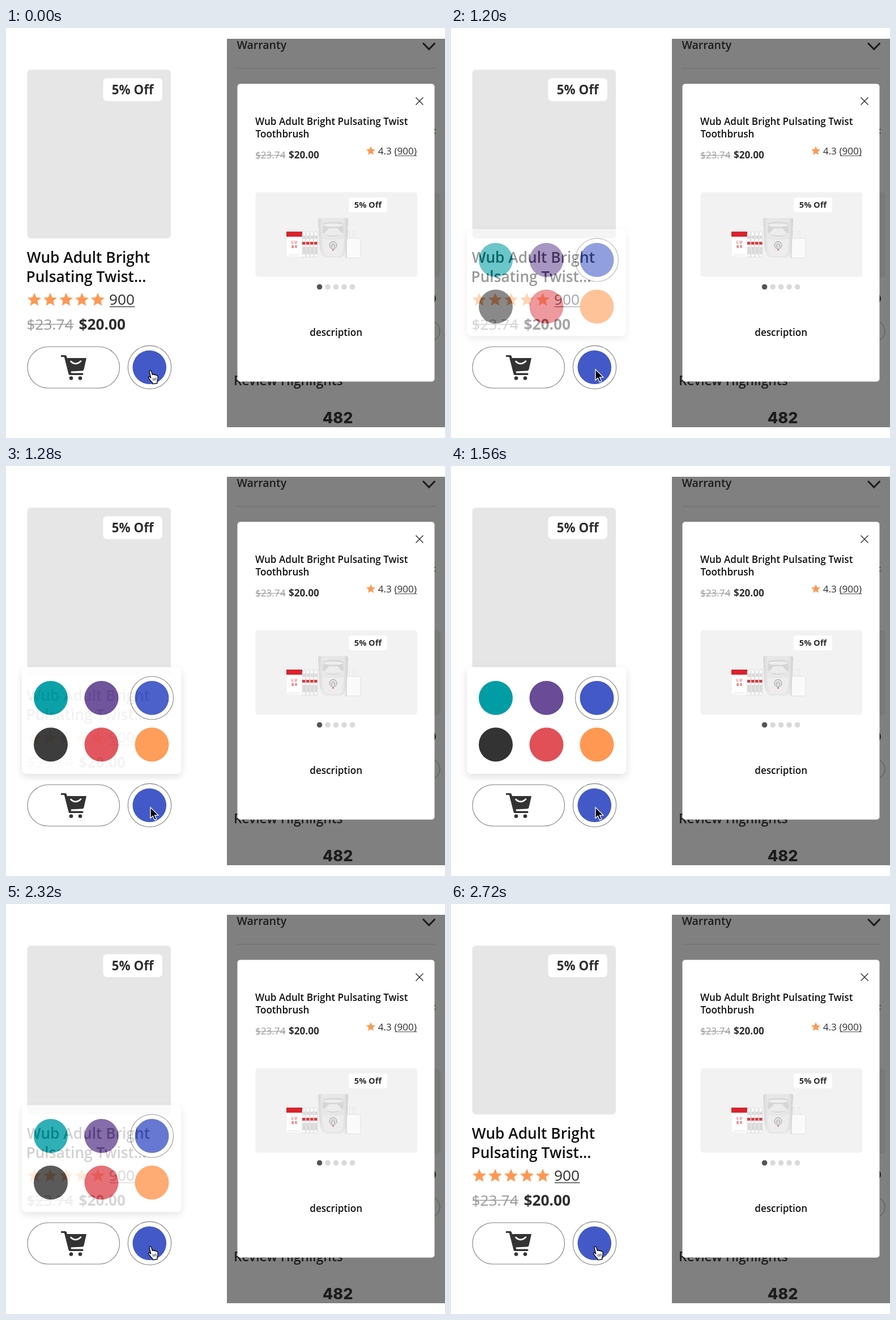
Write an HTML page that moves like this. It is 775x723 px and loops after 3.39 s.

```html
<!DOCTYPE html>
<html lang="en">
<head>
<meta charset="utf-8">
<title>Product card with colour picker</title>
<style>
  html, body { margin: 0; width: 100%; height: 100%; overflow: hidden; background: #fff; }
  svg { display: block; width: 100vw; height: 100vh; }
  text { font-family: "Open Sans", "Noto Sans", sans-serif; fill: #2e2e2e; }
  .semi { font-weight: 600; fill: #111; }
  .bold { font-weight: 700; }
  .old { fill: #999; }
  .big { font-size: 26.3px; }
  .mid { font-size: 17.1px; }
  .count { font: 800 27px Inter, sans-serif; fill: #1c1c1c; }
  .mini { font-size: 6.5px; font-weight: 600; fill: #d8313a; }
  .line { fill: none; stroke: #808080; stroke-width: 1.1; }

  .popup, .arrow, .hand { animation: 3390ms step-end infinite; }
  .popup { animation-name: fade; }
  .arrow { animation-name: arrow; }
  .hand { animation-name: hand; }
  .sheet { filter: drop-shadow(0 5px 7px rgba(0, 0, 0, .13)); }

  @keyframes fade {
    0% { opacity: 0; }
    35.39% { opacity: .58; }
    36.57% { opacity: .82; }
    37.75% { opacity: .95; }
    38.93% { opacity: 1; }
    68.43% { opacity: .81; }
    69.61% { opacity: .55; }
    70.79% { opacity: .3; }
    71.97% { opacity: .13; }
    73.15% { opacity: .04; }
    74.33%, 100% { opacity: 0; }
  }
  @keyframes arrow {
    0% { opacity: 0; }
    35.39% { opacity: 1; }
    68.43%, 100% { opacity: 0; }
  }
  @keyframes hand {
    0% { opacity: 1; }
    35.39% { opacity: 0; }
    68.43%, 100% { opacity: 1; }
  }
</style>
</head>
<body>
<svg viewBox="0 0 775 723">
  <defs>
    <path id="star" fill="#ff9852" d="M0 5.270 6.180 9 4.540 1.970 10-2.760 2.810-3.370 0-10-2.810-3.370-10-2.760-4.540 1.970-6.180 9z"/>
    <linearGradient id="shell">
      <stop offset="0" stop-color="#d6d6d6"/>
      <stop offset=".15" stop-color="#e8e8e8"/>
      <stop offset=".85" stop-color="#e6e6e6"/>
      <stop offset="1" stop-color="#d0d0d0"/>
    </linearGradient>
    <g id="pen">
      <path fill="#fff" stroke="#cfcfcf" stroke-width=".7" d="M1.500 359h3.500l1 5v40H.5v-40z"/>
      <path fill="#dadada" d="M1 366h5v6H1zM1 386h5v13H1z"/>
      <path fill="#d33f45" d="M.5 377h5.500v5H.5z"/>
    </g>
  </defs>

  <!-- Product card -->
  <rect x="37.5" y="73.5" width="253.5" height="297.5" rx="6" fill="#e6e6e6"/>
  <rect x="171.5" y="88.5" width="104.5" height="40.5" rx="7" fill="#fff"/>
  <text class="bold" x="186.8" y="116.500" font-size="22.3">5% Off</text>
  <text class="semi" x="36.8" y="414" font-size="26.3">Wub Adult Bright</text>
  <text class="semi" x="35.5" y="448" font-size="26.3">Pulsating Twist...</text>
  <g id="rating">
    <use href="#star" transform="translate(50 479) scale(1.200)"/>
    <use href="#star" transform="translate(78 479) scale(1.200)"/>
    <use href="#star" transform="translate(106 479) scale(1.200)"/>
    <use href="#star" transform="translate(134 479) scale(1.200)"/>
    <use href="#star" transform="translate(162 479) scale(1.200)"/>
  </g>
  <text class="big" x="182" y="488">900</text>
  <path d="M183 491.5h44.5" stroke="#444" stroke-width="1.4"/>
  <text class="big old" x="36.5" y="531.5">$23.74</text>
  <path d="M38 522.500h81.5" stroke="#999" stroke-width="1.5"/>
  <text class="big bold" x="128.500" y="531.5">$20.00</text>

  <!-- Cart and colour buttons -->
  <rect class="line" x="38" y="562" width="162.5" height="73" rx="36.5"/>
  <g fill="#333">
    <path d="M97 577h7.500q2 0 2.500 2l.8 3H142l-4.500 20q-.6 2.500-3 2.500l-20 1 .6 3H135q1.500 0 1.500 1.800t-1.500 1.800h-22.500q-1.600 0-2-1.800l-7.700-30.300H97z"/>
    <circle cx="115" cy="617.500" r="3.300"/>
    <circle cx="131" cy="617.500" r="3.300"/>
  </g>
  <path d="M114.500 588q8.500 8 17.500-.5" fill="none" stroke="#fff" stroke-width="2.600" stroke-linecap="round"/>
  <circle class="line" cx="253.500" cy="598.300" r="38.200"/>
  <circle cx="253.300" cy="598.300" r="29.800" fill="#4359c7"/>

  <!-- Dimmed page behind the dialog -->
  <rect x="390" y="19" width="385" height="685" fill="#808080"/>
  <text class="semi" x="407.500" y="37.300" font-size="19.500" style="fill:#1c1c1c">Warranty</text>
  <path d="M737 27.500l9.700 10 9.700-10" fill="none" stroke="#1c1c1c" stroke-width="3.200" stroke-linecap="round"/>
  <path d="M408 71h350" stroke="#6c6c6c"/>
  <path d="M755 178h3v2h-3zM755 184.500h3v2h-3z" fill="#222"/>
  <rect x="730" y="290" width="36.500" height="150" rx="5" fill="#797979"/>
  <circle cx="749" cy="477" r="10" fill="#1c1c1c"/>
  <rect x="700" y="516.500" width="66" height="36" rx="18" fill="none" stroke="#505050"/>
  <text class="semi" x="402" y="629.500" font-size="22.700" style="fill:#1c1c1c">Review Highlights</text>
  <text class="count" x="558.700" y="697">482</text>

  <!-- Dialog -->
  <rect x="408.500" y="98.500" width="348" height="525" rx="5" fill="#fff"/>
  <path d="M723.500 122.500l13 13m0-13l-13 13" stroke="#222" stroke-width="1.300"/>
  <text class="semi mid" x="440" y="171">Wub Adult Bright Pulsating Twist</text>
  <text class="semi mid" x="440.500" y="192.500">Toothbrush</text>
  <text class="mid old" x="440" y="230">$23.74</text>
  <path d="M441 224.500h52" stroke="#999" stroke-width="1.100"/>
  <text class="mid bold" x="499" y="230">$20.00</text>
  <use href="#star" transform="translate(644 216.500) scale(.8)"/>
  <text class="mid" x="656.700" y="222.800">4.3</text>
  <text class="mid" x="685.500" y="222.800">(900)</text>
  <path d="M686.500 225.300h39" stroke="#444"/>
  <rect x="440.500" y="289.500" width="285.500" height="149" rx="5" fill="#f2f2f2"/>

  <!-- Product set -->
  <path fill="#fff" d="M496 361h27v42l-27-1z"/>
  <path fill="#d8232e" d="M495 359h28v9h-28z"/>
  <text class="mini" x="504" y="380">L U</text>
  <text class="mini" x="504" y="388">B R</text>
  <path d="M499 400h20" stroke="#ddd"/>
  <use href="#pen" x="522.500"/>
  <use href="#pen" x="529.500"/>
  <use href="#pen" x="536.500"/>
  <use href="#pen" x="543.500"/>
  <path d="M603.500 358.500h2.500v13h-2.500zM613 358.500h2.500v13H613z" fill="#fff" stroke="#d8d8d8" stroke-width=".8"/>
  <rect x="597.500" y="371" width="28.500" height="34.500" rx="3" fill="#fafafa" stroke="#dcdcdc" stroke-width=".8"/>
  <path d="M598 372h4v33h-3z" fill="#dedede"/>
  <path d="M554 335h47q3 0 3 4l-2 40q-1.500 25-12 26h-25q-10.500-1-12-26l-2-40q0-4 3-4z" fill="url(#shell)"/>
  <path d="M560 344q17-4 35 0l1 16q-8 8-18.500 8t-18.500-8z" fill="#d6d6d6"/>
  <path d="M561 346q16-3 33 0v3q-16 3-33 0z" fill="#eee"/>
  <path d="M570 353h15l9 10q-16 6-33 0z" fill="#ececec"/>
  <path d="M558 372q19 4 39 0l-3 21q-2 9-6 9h-21q-4 0-6-9z" fill="#ededed"/>
  <circle cx="577.500" cy="383" r="6.500" fill="#e3e3e3" stroke="#9a9a9a"/>
  <path d="M575 387v-4q2.500-5 5 0v4" fill="none" stroke="#999"/>
  <circle cx="577.500" cy="391.500" r="1.300" fill="#e0505a"/>

  <rect x="605" y="299" width="68" height="26" rx="4" fill="#fff"/>
  <text class="bold" x="614.800" y="317.300" font-size="14.600">5% Off</text>
  <g fill="#dadada">
    <circle cx="553.500" cy="456.500" r="4.800" fill="#555"/>
    <circle cx="568" cy="456.500" r="4.800"/>
    <circle cx="582.500" cy="456.500" r="4.800"/>
    <circle cx="597" cy="456.500" r="4.800"/>
    <circle cx="611.500" cy="456.500" r="4.800"/>
  </g>
  <text class="semi mid" x="536.300" y="543.300">description</text>

  <!-- Colour picker -->
  <g class="popup">
    <rect class="sheet" x="28" y="354.500" width="281.500" height="188.500" rx="8" fill="#fff"/>
    <circle cx="79" cy="409" r="30" fill="#009da5"/>
    <circle cx="168.500" cy="409" r="30" fill="#694b97"/>
    <circle cx="257.500" cy="409" r="30" fill="#4359c7"/>
    <circle class="line" cx="257.500" cy="409" r="38"/>
    <circle cx="79" cy="491.300" r="30" fill="#333"/>
    <circle cx="168.500" cy="491.300" r="30" fill="#e14f57"/>
    <circle cx="257.500" cy="491.300" r="30" fill="#ff9852"/>
  </g>

  <!-- Pointers -->
  <path class="arrow" d="M255 602v19l4.300-4 3.100 7.200 3.200-1.400-3.100-7h6.300z" stroke="#fff" stroke-width="1.300"/>
  <g class="hand" stroke="#000" stroke-width="1.300" stroke-linejoin="round">
    <path fill="#fff" d="M253.200 606.500c-.6-2.600 2.600-3.400 3.400-1l1.800 6c.6-1.400 3-1.400 3.400.4.8-1.200 2.800-.8 3.200.8 1-.8 2.600-.2 2.800 1.200.6 3.400.6 6.500-1 9.200l.2 3.400-8 1.200-.6-2.600c-2.200-1.400-4.200-4.400-6.600-8-1-1.800 1-2.800 2.400-1.600l1.600 1.600z"/>
    <path d="M259.500 617.500l.6 4.500m2-5l.5 4.600m2-5l.5 4.300" stroke-width=".9"/>
  </g>
</svg>
</body>
</html>
```
